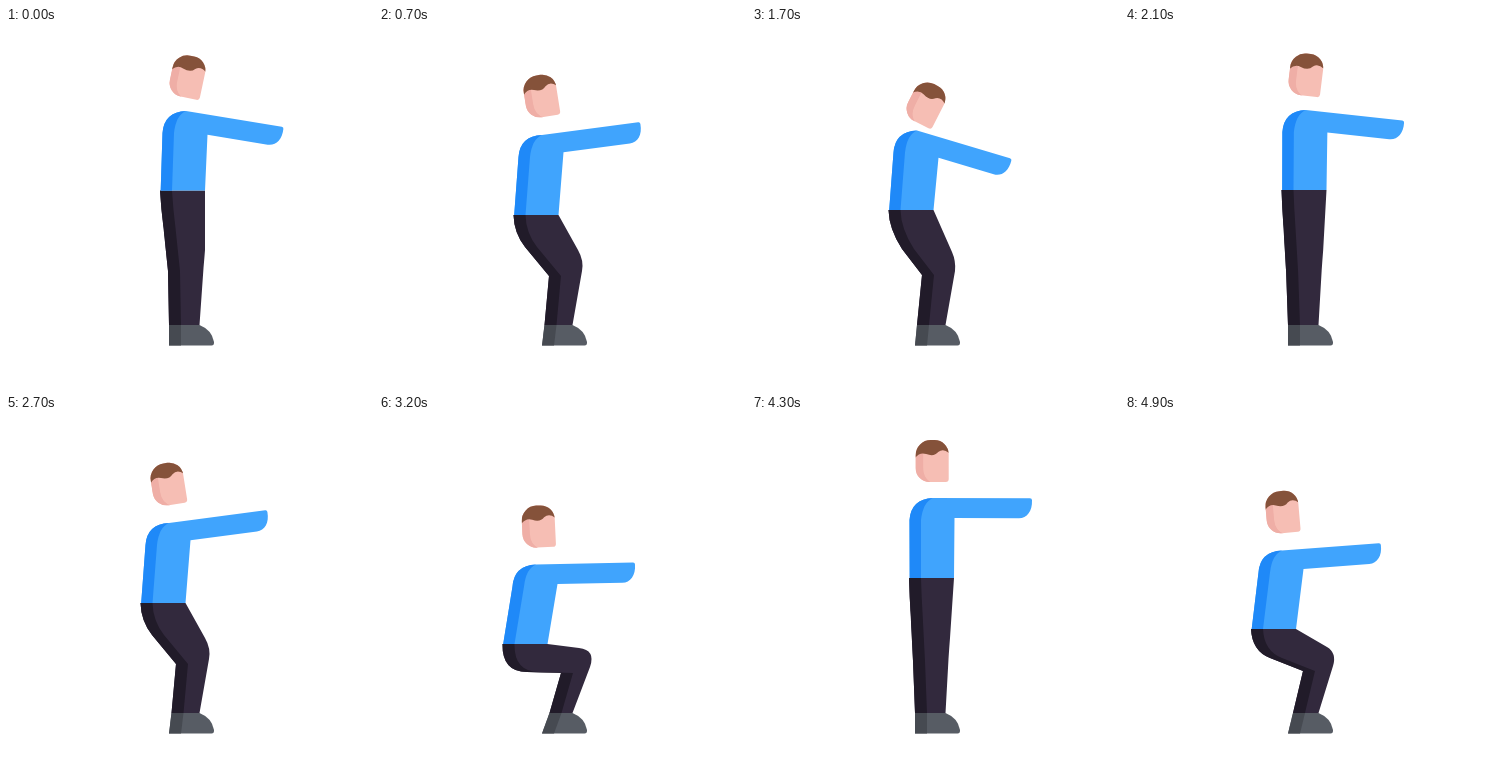
Write an HTML page with a canvas that moves like this. It is 367 px wide and 360 px high and loops after 5000 ms.

```html
<!DOCTYPE html>
<html lang="en">
<head>
<meta charset="utf-8">
<title>Squat</title>
<style>
html, body { margin: 0; width: 100%; height: 100%; overflow: hidden; background: #fff; }
canvas { display: block; width: 367px; height: 360px; }
</style>
</head>
<body>
<canvas id="stage" width="367" height="360"></canvas>
<script>
const ctx = document.getElementById('stage').getContext('2d');
const LOOP = 5000, CYCLE = 20, STEP = 100;
const SHADE = 12, HIP_WIDTH = 45, FOOT = 317.5, ANKLE = 297;

const color = {
  shirt: '#40a4fd', shirtDark: '#1f89f8',
  pants: '#32293d', pantsDark: '#211b29',
  shoe: '#575c64', shoeDark: '#464a51',
  skin: '#f6beb4', skinDark: '#efaea6', hair: '#85523a'
};

// x of the back of the hip, one value per step of a squat
const sway = [154, 156.5, 157, 157, 156, 151.5, 143, 134.5, 128.5, 126,
  124.4, 123.7, 123.5, 123.5, 124.2, 126.6, 131, 136.5, 144, 150];

// hip x, hip y, shoulder, seat control, thigh back, knee back, ankle back x,
// knee front: start, control, end
const poses = [
  [123.5, 228, 157, 148.5, 123, 256, 148, 256, 182, 257, 170.5, 200, 232, 217, 234, 211, 251],
  [126, 213, 157, 134.5, 127, 235, 145, 242, 178, 255, 168, 202, 231, 212, 237, 208, 250],
  [134.5, 187, 163, 107, 135, 205, 146, 219, 170, 248, 165.5, 199, 222, 205, 232.5, 203, 243],
  [136.5, 182, 165, 102.5, 137, 201, 150, 221, 170, 247, 165, 200, 224, 204, 233, 203, 243],
  [154, 162.5, 180, 83, 155, 180, 157.5, 200, 162, 243, 163, 199, 222, 198.3, 231, 197.5, 240],
  [157, 162, 181, 82, 157.5, 180, 158.7, 200, 161, 245, 163, 198, 222, 197.2, 232, 196.5, 243]
];

// step, arm angle, head tilt, head offset from the shoulder
const swings = [
  [0, 9.3, 12, 1.5, -34.5],
  [1, 6.2, 7, 0, -35.5],
  [4, -2.5, -3, -1, -37.5],
  [7, -7.6, -9, -1, -39],
  [9, -4.3, -5, 0.5, -38.5],
  [13, 0.8, 0, 3.5, -37],
  [17, 16.6, 27, 9, -27]
];

const wrap = rows => {
  const shift = (r, d) => [r[0] + d, ...r.slice(1)];
  return [shift(rows[rows.length - 1], -CYCLE), ...rows,
    shift(rows[0], CYCLE), shift(rows[1], CYCLE)];
};
const swingKeys = wrap(swings);

// Hermite curve through rows of [x, ...values]
function curve(rows, x) {
  let i = 0;
  while (i < rows.length - 2 && x >= rows[i + 1][0]) i++;
  const a = rows[i], b = rows[i + 1];
  const before = rows[Math.max(0, i - 1)], after = rows[Math.min(rows.length - 1, i + 2)];
  const w = b[0] - a[0], s = (x - a[0]) / w, s2 = s * s, s3 = s2 * s;
  return a.slice(1).map((_, k) => {
    const c = k + 1;
    const ma = w * (b[c] - before[c]) / (b[0] - before[0]);
    const mb = w * (after[c] - a[c]) / (after[0] - a[0]);
    return (2 * s3 - 3 * s2 + 1) * a[c] + (s3 - 2 * s2 + s) * ma +
      (3 * s2 - 2 * s3) * b[c] + (s3 - s2) * mb;
  });
}

function shape(fill, draw) {
  ctx.beginPath();
  draw();
  ctx.closePath();
  ctx.fillStyle = fill;
  ctx.fill();
}

function drawLegs(x, p) {
  const [hipY, , , cx, cy, tx, ty, kx, ky, ax, fx, fy, gx, gy, hx, hy] = p;
  const leg = () => {
    ctx.moveTo(x, hipY);
    ctx.quadraticCurveTo(cx, cy, tx, ty);
    ctx.lineTo(kx, ky);
    ctx.lineTo(ax, ANKLE);
    ctx.lineTo(193.5, ANKLE);
    ctx.lineTo(hx, hy);
    ctx.quadraticCurveTo(gx, gy, fx, fy);
    ctx.lineTo(x + HIP_WIDTH, hipY);
  };
  shape(color.pants, leg);
  ctx.save();
  ctx.beginPath();
  leg();
  ctx.clip();
  shape(color.pantsDark, () => {
    ctx.moveTo(x - 1, hipY);
    ctx.quadraticCurveTo(cx - 1, cy + 1, tx, ty + 1);
    ctx.lineTo(kx - 1, ky + 1);
    ctx.lineTo(ax - 1, ANKLE);
    ctx.lineTo(ax + SHADE, ANKLE);
    ctx.lineTo(kx + SHADE, ky);
    ctx.lineTo(tx + SHADE, ty);
    ctx.quadraticCurveTo(cx + SHADE, cy, x + SHADE, hipY);
  });
  ctx.restore();

  shape(color.shoe, () => {
    ctx.moveTo(ax, ANKLE);
    ctx.lineTo(193.5, ANKLE);
    ctx.quadraticCurveTo(206, 302, 208, 314);
    ctx.quadraticCurveTo(208.3, FOOT, 205.5, FOOT);
    ctx.lineTo(163, FOOT);
  });
  shape(color.shoeDark, () => {
    ctx.moveTo(ax, ANKLE);
    ctx.lineTo(ax + SHADE, ANKLE);
    ctx.lineTo(163 + SHADE, FOOT);
    ctx.lineTo(163, FOOT);
  });
}

function drawTorso(x, hipY, sx, sy, angle) {
  const cos = Math.cos(angle), sin = Math.sin(angle);
  const arm = (u, v) => [sx + u * cos - v * sin, sy + u * sin + v * cos];
  const back = () => {
    ctx.moveTo(x + 0.7, hipY);
    ctx.lineTo(sx - 23.5, sy + 22);
    ctx.quadraticCurveTo(sx - 22, sy + 1, sx, sy);
  };
  shape(color.shirt, () => {
    back();
    ctx.lineTo(...arm(97, 0));
    ctx.quadraticCurveTo(...arm(99, 0), ...arm(99, 2));
    ctx.bezierCurveTo(...arm(99.5, 13), ...arm(94, 20), ...arm(86, 20));
    ctx.lineTo(...arm(21.5 / cos + 20 * Math.tan(angle), 20));
    ctx.lineTo(x + HIP_WIDTH, hipY);
  });
  shape(color.shirtDark, () => {
    back();
    ctx.quadraticCurveTo(sx - 10, sy + 4, sx - SHADE, sy + 22);
    ctx.lineTo(x + SHADE, hipY);
  });
}

function drawHead(x, y, tilt) {
  ctx.save();
  ctx.translate(x, y);
  ctx.rotate(tilt);
  ctx.beginPath();
  ctx.roundRect(-16.5, -21, 33, 42, [15, 14, 3, 14]);
  ctx.fillStyle = color.skin;
  ctx.fill();
  ctx.clip();
  shape(color.skinDark, () => {
    ctx.moveTo(-17, -12);
    ctx.lineTo(-9, -12);
    ctx.lineTo(-9, 7);
    ctx.quadraticCurveTo(-9, 18, 0, 22);
    ctx.lineTo(-17, 22);
  });
  shape(color.hair, () => {
    ctx.moveTo(-17, -22);
    ctx.lineTo(-17, -3.5);
    ctx.quadraticCurveTo(-12, -9.5, -6, -7);
    ctx.quadraticCurveTo(2, -4, 6, -9);
    ctx.quadraticCurveTo(11, -13, 17, -8);
    ctx.lineTo(17, -22);
  });
  ctx.restore();
}

function draw(step) {
  const x = sway[step];
  const pose = curve(poses, x);
  const [hipY, sx, sy] = pose;
  const [arm, tilt, dx, dy] = curve(swingKeys, step);
  const rad = Math.PI / 180;
  ctx.fillStyle = '#fff';
  ctx.fillRect(0, 0, 367, 360);
  drawLegs(x, pose);
  drawTorso(x, hipY, sx, sy, arm * rad);
  drawHead(sx + dx, sy + dy, tilt * rad);
}

const start = performance.now();
function tick() {
  const t = (performance.now() - start + 15) % LOOP;
  draw(Math.floor(t / STEP) % CYCLE);
  requestAnimationFrame(tick);
}
tick();
</script>
</body>
</html>
```
